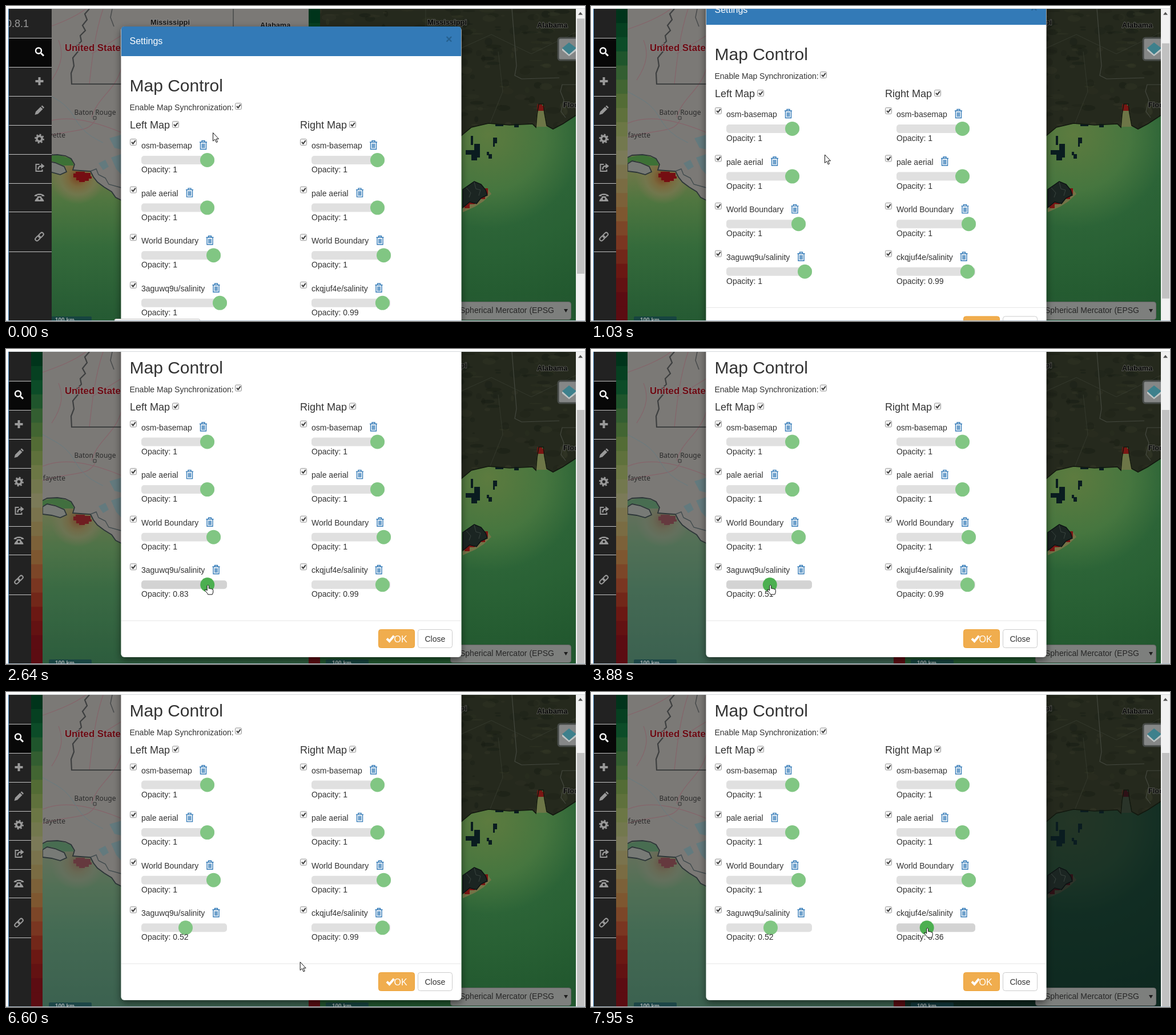
Animation of 1014x553 px, one loop 8000 ms. Source, as an HTML page:

```html
<!DOCTYPE html>
<html lang="en">
<head>
<meta charset="utf-8">
<title>Map Control</title>
<style>
html, body { margin: 0; width: 100%; height: 100%; overflow: hidden; background: #fff; }
svg { display: block; }
text { font-family: "Liberation Sans", Arial, sans-serif; white-space: pre; }
.place { font-weight: bold; paint-order: stroke; stroke-width: 2px; }
.town { font-family: "Noto Sans", sans-serif; font-size: 12px; }
</style>
</head>
<body>
<svg id="stage" width="1014" height="553" viewBox="0 0 1014 553"></svg>
<script>
const LOOP = 8000, SCROLL = 107.5, ROW = 83.6;

// ---------- drawing helpers ----------
const rect = (x, y, w, h, fill, more = '') =>
  `<rect x="${x}" y="${y}" width="${w}" height="${h}" fill="${fill}" ${more}/>`;
const text = (x, y, s, size = 14, fill = '#333', more = '') =>
  `<text x="${x}" y="${y}" font-size="${size}" fill="${fill}" ${more}>${s}</text>`;
const fillPath = (d, fill, more = '') => `<path d="${d}" fill="${fill}" ${more}/>`;
const line = (d, stroke, width = 1, more = '') =>
  `<path d="${d}" fill="none" stroke="${stroke}" stroke-width="${width}" ${more}/>`;
const at = (x, y, s) => `<g transform="translate(${x} ${y})">${s}</g>`;
const stops = list => list.map(([o, c, a = 1]) =>
  `<stop offset="${o}" stop-color="${c}" stop-opacity="${a}"/>`).join('');

let seed = 11;
const random = () => (seed = seed * 16807 % 2147483647) / 2147483647;

// ---------- map ----------
const RAMP = ['#00341b', '#0c4c28', '#335e31', '#536c35', '#6c7745', '#7b7a58',
  '#7a6c43', '#7e5730', '#7a3621', '#6b1813', '#5c0c12'];

function colorBar(x) {
  const step = 547 / (RAMP.length * 2);
  let out = '';
  for (let i = 0; i < RAMP.length * 2; i++) {
    out += rect(x, 5 + i * step, 20, step + 1, RAMP[i >> 1]);
    if (i % 2) out += rect(x, 5 + i * step, 20, step + 1, RAMP[Math.min(i + 1 >> 1, 10)], 'opacity=".5"');
  }
  return out;
}

const scaleBar = x =>
  rect(x, 545, 75, 10, '#123d44', 'opacity=".75" rx="2"') +
  text(x + 11, 555, '100 km', 10, '#a5acac', 'font-weight="bold"');

function leftMap() {
  const sea = 'M64 266L72 262 90 261 104 263 114 268 120 278 117 288 130 289 148 290 153 300 ' +
    '160 309 172 318 185 326 192 336 202 341H530V552H64Z';
  const islands = 'M64 277L72 272 86 275 102 282 106 291 95 296 80 292 64 290Z';
  const pinkRoads = 'M64 41C95 30 120 20 140 5M80 130C100 100 100 80 92 60M64 206C100 190 150 200 202 222' +
    'M150 196C160 160 190 150 202 110M156 200C145 225 110 215 64 231M146 137C150 100 155 50 170 5M202 52L150 84';
  const river = 'M146 5L138 14 142 24 134 34 139 43 130 52 132 62 123 71 126 80 117 91 119 105 114 118 115 137H202';
  return rect(64, 5, 466, 547, '#7b7976') +
    line(pinkRoads, '#85646a', 1.2) +
    line('M64 150C90 165 105 170 120 196S150 230 170 240', '#667b81') +
    fillPath('M181 232L202 226V252L190 249ZM184 266L202 260V296L193 286ZM162 276L174 270 180 282 170 288Z', '#637a7e') +
    fillPath(sea, '#556a6f') +
    `<g id="leftLayer">${fillPath(sea, 'url(#gulfLeft)')}${fillPath(sea, 'url(#plume)')}` +
    fillPath('M64 266L90 261 114 268 119 280 100 280 80 272 64 275Z', '#3d7136') +
    fillPath('M118 294H122V291H138V293H148V299H150V303H145V307H138V309H128V306H123V301H118Z', '#750e12') + '</g>' +
    fillPath(islands, '#777a76') +
    line(islands, '#2c3538', 1.8) +
    line(sea.replace('H530V552H64Z', ''), '#2c3538', 1.8) +
    line('M148 290L158 286 162 296 174 302 180 313 202 319', '#414b4e', 1.4) +
    line(river, '#333637', 2.2, 'opacity=".85"') +
    line('M398 5V36M186 5L183 20 189 36', '#4a4c4d', 1.6) +
    text(253, 33, 'Mississippi', 12.8, '#151515', 'class="place" stroke="#888"') +
    text(445, 38, 'Alabama', 12.8, '#151515', 'class="place" stroke="#888"') +
    text(103, 79, 'United States', 16.8, '#6d0a12', 'class="place" stroke="#858080"') +
    text(119.5, 191, 'Baton Rouge', 12, '#2b2b2b', 'class="town"') +
    text(58, 231, 'afayette', 11, '#2b2b2b', 'class="town"') +
    line('M153 194h5v5h-5z', '#333');
}

function rightMap() {
  const sea = 'M550 552V330L797 228 815 213 845 206 882 209 922 207 928 213 930 190 933 172 941 172 ' +
    '943 188 947 210 958 216 975 207 998 192V552Z';
  const delta = 'M800 322L810 315 820 308 832 313 840 323 843 332 832 337 824 347 812 344 800 354Z';
  const holes = 'M814 228h4v16h-4zM820 242h10v24h-5v5h-10v-10h-10v-8h15zM853 231h7v10h-4v6h-3zM842 256h4v4h5v8h-6v-6h-3z' +
    'M857 207h14v4h-14zM890 207h8v6h-8z';
  let ground = '';
  for (let i = 0; i < 260; i++) {
    ground += `<ellipse cx="${550 + random() * 448}" cy="${5 + random() * 205}" rx="${2 + random() * 13}" ` +
      `ry="${1 + random() * 6}" fill="${random() < .5 ? '#343727' : '#171d14'}" opacity="${.15 + random() * .4}"/>`;
  }
  return rect(550, 5, 448, 547, '#25291d') + ground +
    fillPath(sea, '#030e18') +
    `<g id="rightLayer">${fillPath(sea, 'url(#gulfRight)')}` +
    fillPath('M930 184H943L948 212H927Z', '#6f7848') +
    fillPath('M931 172h8v3h4v9h-13v-8z', '#7c1713') +
    fillPath('M800 338L843 320 850 330 836 343 822 352 800 362Z', '#767548') +
    fillPath('M834 320h10v10h-5v9h-7zM803 338h18v10h-9v7h-9z', '#7c1713') + '</g>' +
    fillPath(holes, '#0a1c20') +
    fillPath(delta, '#1b2522') +
    line(delta, '#0b1112', 1.5) +
    line('M820 309l3 12 8 2-3 10M806 319l8 9-3 8', '#39443f') +
    line(sea.slice(sea.indexOf('797') - 0).replace(/^/, 'M').replace('V552Z', ''), '#12180f', 1.6) +
    line('M886 5L894 105 891 122 903 128M903 128L969 126M998 138H974L971 150 977 165 972 185 980 196', '#44483f', 1.2) +
    line('M735 5V36M797 74L850 50 920 84 998 46M848 205L870 150 862 80', '#3f4337', 1, 'opacity=".6"') +
    text(738, 33, 'Mississippi', 12.8, '#080808', 'class="place" stroke="#54564f"') +
    text(930, 38, 'Alabama', 12.8, '#080808', 'class="place" stroke="#54564f"') +
    text(976, 178, 'Florida', 12.8, '#080808', 'class="place" stroke="#54564f"') +
    rect(967, 56, 40, 39, '#858787', 'rx="4" stroke="#474b48" stroke-width="3"') +
    fillPath('M974 78L986 88 999 78V75H974Z', '#c0c5c5') +
    fillPath('M974 74L986 64 999 74 986 85Z', '#3d808c') +
    rect(778.5, 519.5, 211, 31, '#7d7f7d', 'rx="4" stroke="#666"') +
    text(795, 539, 'Spherical Mercator (EPSG', 14, '#262626') +
    fillPath('M977 532h7l-3.500 6z', '#1c1c1c');
}

// ---------- sidebar ----------
const ICONS = [
  [80, '#fff', line('M3 3L7.500 7.500', '#fff', 3) + '<circle cx="-1.500" cy="-1.500" r="5" fill="none" stroke="#fff" stroke-width="2.400"/>'],
  [132, '#999', line('M-7 0H7M0-7V7', '#999', 4)],
  [183, '#999', fillPath('M-8 8L-6.500 2.500 2-6 6-2-2.500 6.500ZM3-7L5-8.500 8.500-5 7-3Z', '#999')],
  [233, '#999', '<circle r="4.600" fill="none" stroke="#999" stroke-width="3.600"/>' +
    '<circle r="7.200" fill="none" stroke="#999" stroke-width="2.400" stroke-dasharray="2.800 2.855"/>'],
  [284, '#999', line('M0-6H-6V6H5V3', '#999', 2) + line('M-2 3C-2-2 0-3 4-3', '#999', 2.4) + fillPath('M3-8L9-3 3 2Z', '#999')],
  [336, '#999', fillPath('M-9-2C-8-8 8-8 9-2H4V-4H-4V-2ZM-8 7C-8 3-4 2-3-2H3C4 2 8 3 8 7Z', '#999') + '<circle cy="2.500" r="2" fill="#222"/>'],
  [405, '#999', `<g transform="rotate(-45)" fill="none" stroke="#999" stroke-width="2"><rect x="-9" y="-3" width="10" height="6" rx="3"/>` +
    '<rect x="-1" y="-3" width="10" height="6" rx="3"/></g>']
];

const sidebar = () =>
  rect(0, 5, 80, 547, '#222') + rect(0, 56, 80, 51, '#080808') +
  [56, 107, 158, 209, 260, 311, 361, 431].map(y => rect(0, y, 80, 1, '#c4c4c4')).join('') +
  text(0, 37, '0.8.1', 18, '#999') +
  ICONS.map(([y, , art]) => at(58.5, y, art)).join('');

// ---------- dialog ----------
const checkbox = (x, y) =>
  rect(x + .5, y + .5, 11, 11, '#f3f3f3', 'rx="2" stroke="#999"') +
  line(`M${x + 3} ${y + 6}l2.500 2.600 4.300-5.600`, '#3c3c3c', 2);

const trash = (x, y) => at(x, y,
  line('M-6.500-5H6.500M-2.500-5V-7.500H2.500V-5M-5-4.500V7.500H5V-4.500M-2-2.500V5.500M0-2.500V5.500M2-2.500V5.500', '#337ab7', 1.4));

const COLUMNS = [
  { id: 'left', x: 217, title: 'Left Map', tick: 291, layer: '3aguwq9u/salinity', trash: 368, width: 150 },
  { id: 'right', x: 515, title: 'Right Map', tick: 601, layer: 'ckqjuf4e/salinity', trash: 653, width: 138 }
];

function layerRow(x, i, name, trashX, width, id) {
  const y = 245 + i * ROW;
  return checkbox(x, y - 12) + text(x + 20, y + 5, name) + trash(trashX, y - 1) +
    `<g ${id ? `id="${id}Slider"` : ''} opacity=".7">` + rect(x + 20, y + 18, width, 15, '#d3d3d3', 'rx="5"') +
    `<circle ${id ? `id="${id}Knob"` : ''} cx="${x + 7.5 + width}" cy="${y + 25.5}" r="12.500" fill="#4caf50"/></g>` +
    text(x + 20, y + 47, 'Opacity: 1', 14, '#333', id ? `id="${id}Label"` : '');
}

const column = c =>
  text(c.x, 215, c.title, 18) + checkbox(c.tick, 202) +
  layerRow(c.x, 0, 'osm-basemap', c.x + 128.5, 128) +
  layerRow(c.x, 1, 'pale aerial', c.x + 104.5, 128) +
  layerRow(c.x, 2, 'World Boundary', c.x + 140, 139) +
  layerRow(c.x, 3, c.layer, c.trash, c.width, c.id);

const dialog = () =>
  rect(201.5, 36, 596, 612.5, '#fff', 'rx="6" filter="url(#shadow)"') +
  fillPath('M202 88V41Q202 36 207 36H792Q797 36 797 41V88Z', '#337ab7') +
  text(216.5, 67, 'Settings', 16, '#fff') +
  text(770, 65, '×', 20, '#25608f', 'font-weight="bold"') +
  text(216.5, 150, 'Map Control', 30) +
  text(216.5, 183, 'Enable Map Synchronization:') + checkbox(401, 170) +
  COLUMNS.map(column).join('') +
  rect(202, 584, 595, 1, '#e5e5e5') +
  rect(652.5, 600, 63, 32, '#f0ad4e', 'id="ok" rx="4" stroke="#eea236"') +
  line('M667 616l4.500 4.500 8-9.500', '#fff', 4) + text(679.5, 622, 'OK', 16, '#fff') +
  rect(721.5, 600, 60, 32, '#fff', 'rx="4" stroke="#ccc"') + text(733.5, 621.5, 'Close');

// ---------- scene ----------
const $ = id => document.getElementById(id);
$('stage').innerHTML = `<defs>
  <clipPath id="page"><rect x="4" y="5" width="994" height="547"/></clipPath>
  <clipPath id="view"><rect x="4" y="5" width="1010" height="547"/></clipPath>
  <filter id="shadow" x="-5%" y="-5%" width="110%" height="110%"><feDropShadow dx="0" dy="5" stdDeviation="7" flood-opacity=".5"/></filter>
  <linearGradient id="gulfLeft" gradientUnits="userSpaceOnUse" x1="0" y1="290" x2="0" y2="552">
    ${stops([[0, '#6f7748'], [.2, '#4f7640'], [.5, '#356b3b'], [1, '#255a33']])}</linearGradient>
  <radialGradient id="plume" gradientUnits="userSpaceOnUse" cx="126" cy="300" r="48">
    ${stops([[0, '#79411f'], [.35, '#7a693d'], [.65, '#77774f', .8], [1, '#77774f', 0]])}</radialGradient>
  <radialGradient id="gulfRight" gradientUnits="userSpaceOnUse" cx="845" cy="225" r="330">
    ${stops([[0, '#5f7d40'], [.3, '#477840'], [.5, '#2d6638'], [1, '#22582f']])}</radialGradient>
</defs>` +
  rect(0, 0, 1014, 553, '#fff') +
  `<g clip-path="url(#page)">${leftMap()}${rightMap()}${colorBar(44)}${colorBar(530)}${scaleBar(75)}${scaleBar(560)}` +
  `<g id="sidebar">${sidebar()}</g></g>` +
  rect(4, 5, 1, 547, '#3f7fb8') +
  `<g clip-path="url(#page)"><g id="dialog">${dialog()}</g></g>` +
  `<g id="status">${rect(190, 549.5, 150, 6, '#f4f4f4', 'rx="3" stroke="#c8c8c8"')}</g>` +
  `<g clip-path="url(#view)">${rect(998, 5, 16, 547, '#f1f1f1')}${rect(1000, 22, 13, 448, '#c1c1c1', 'id="thumb"')}</g>` +
  fillPath('M1002 15.500h8l-4-5z', '#505050') +
  rect(4, 4, 1010, 1, '#d5d9dc') + rect(0, 552, 1014, 1, '#b4c4d0') +
  `<g id="cursor"><g id="arrow">${fillPath('M.5.5V15L4 12 6.300 17.500 8.500 16.500 6.200 11.300H10.500Z', '#fff', 'stroke="#111"')}</g>` +
  `<g id="hand">${fillPath('M-1.500 1.500Q0-.5 1.500 1.500V6.500Q3 5.500 4 7 6 6 6.800 7.800 9 7.200 9 9.500V13Q8.500 15 7.500 17H0Q-1-14-1 14-5 11-5.500 8.500-4 7.500-1.500 10Z'.replace('-1-14-1 14', '-1 14.500-3.500 12'), '#fff', 'stroke="#111" stroke-linejoin="round"')}</g></g>`;

// ---------- motion ----------
// Bursts of change as [start, end, steps]; the picture holds between steps.
const BURSTS = [[150, 1150, 8], [1270, 1930, 6], [2220, 3210, 8], [3330, 3450, 2],
  [3730, 4670, 8], [5100, 5400, 3], [6080, 7110, 8], [7230, 7950, 6]];

function snap(t) {
  let s = 0;
  for (const [a, b, n] of BURSTS) {
    if (t < a) break;
    const d = (b - a) / (n - 1);
    s = a + Math.min(n - 1, Math.floor((t - a) / d + .001)) * d;
  }
  return s;
}

// Linear interpolation through [time, value] keys.
function follow(keys, t) {
  const i = keys.findIndex(k => k[0] > t);
  if (i < 0) return keys[keys.length - 1][1];
  if (!i) return keys[0][1];
  const [a, u] = keys[i - 1], [b, v] = keys[i];
  return u + (v - u) * (t - a) / (b - a);
}

const FOLD = [[150, 0], [579, 36]];
const WHEEL = [[864, 0], [1007, 55], [1150, SCROLL]];
const LEFT_VALUE = [[2220, 1], [3210, .39], [3330, .4], [3450, .44], [3730, .48], [3864, .51],
  [4267, .54], [4670, .53], [5400, .52]];
const RIGHT_VALUE = [[7374, .99], [7950, .36]];
const POINTER_X = [[0, 362], [864, 407], [1150, 411], [1600, 428], [1930, 392], [2219, 392],
  [6079, 320], [6375, 430], [6669, 600], [6816, 684], [7110, 663]];
const POINTER_Y = [[0, 222], [864, 258], [1150, 263], [1600, 340], [1930, 413], [2219, 413],
  [6079, 420], [6375, 455], [6669, 492], [6816, 508], [7110, 432]];

const show = (id, on) => $(id).setAttribute('visibility', on ? 'visible' : 'hidden');
const move = (id, x, y) => $(id).setAttribute('transform', `translate(${x} ${y})`);

function draw(time) {
  const t = snap(time);
  const scroll = follow(WHEEL, t);
  const values = [follow(LEFT_VALUE, t), follow(RIGHT_VALUE, t)];
  const knobs = COLUMNS.map((c, i) => c.x + 32.5 + (c.width - 25) * values[i]);
  const dragging = t >= 7230 ? 1 : t >= 2220 && t < 6080 ? 0 : -1;
  const x = dragging < 0 ? follow(POINTER_X, t) : knobs[dragging] + 1;
  const y = dragging < 0 ? follow(POINTER_Y, t) : 414;

  move('sidebar', -follow(FOLD, t), 0);
  move('dialog', 0, -scroll);
  $('thumb').setAttribute('y', 22 + scroll * 85 / SCROLL);
  show('status', t < 150);

  COLUMNS.forEach((c, i) => {
    $(c.id + 'Knob').setAttribute('cx', knobs[i]);
    $(c.id + 'Slider').setAttribute('opacity', i === dragging ? 1 : .7);
    $(c.id + 'Label').textContent = 'Opacity: ' + +values[i].toFixed(2);
    $(c.id + 'Layer').setAttribute('opacity', values[i]);
  });

  const overOk = x > 652 && x < 716 && y > 493 && y < 525;
  $('ok').setAttribute('fill', overOk ? '#ec971f' : '#f0ad4e');
  const hand = dragging >= 0 || overOk;
  show('hand', hand);
  show('arrow', !hand);
  move('cursor', x, y);
}

const start = performance.now();
function tick() {
  draw((performance.now() - start) % LOOP);
  requestAnimationFrame(tick);
}
tick();
</script>
</body>
</html>
```
